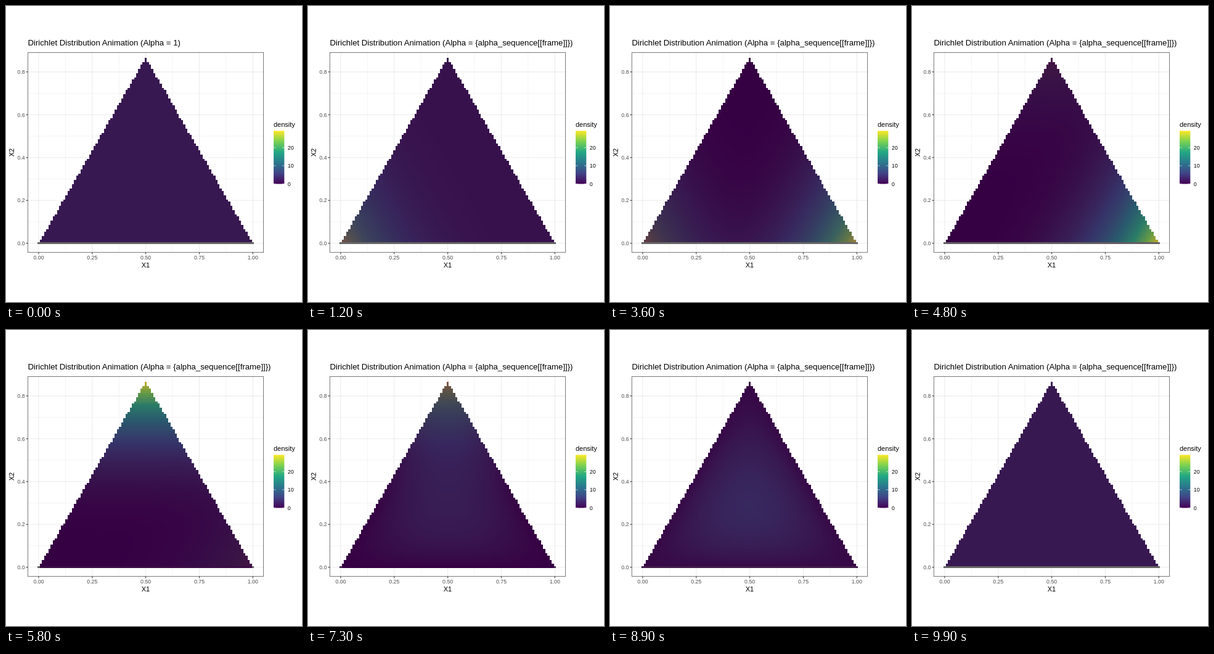
Write an HTML page with a canvas that moves like this. It is 480 px wide and 480 px high and loops after 10 s.

```html
<!DOCTYPE html>
<html lang="en">
<head>
<meta charset="utf-8">
<title>Dirichlet Distribution Animation</title>
<style>
  html, body { margin: 0; width: 100%; height: 100%; overflow: hidden; background: #fff; }
  svg, canvas { position: absolute; left: 0; top: 0; width: 480px; height: 480px; }
  text { font-family: "Liberation Sans", Arial, sans-serif; font-size: 11px; white-space: pre; }
  .small { font-size: 8.8px; fill: #4d4d4d; }
  .legend { font-size: 8.8px; }
  #title { font-size: 13.2px; }
</style>
</head>
<body>
<svg id="plot" viewBox="0 0 480 480">
  <defs><linearGradient id="ramp" x1="0" y1="1" x2="0" y2="0"></linearGradient></defs>
  <text id="title" x="35.5" y="64"></text>
  <text x="226.5" y="424" text-anchor="middle">X1</text>
  <text transform="translate(13 237.5) rotate(-90)" text-anchor="middle">X2</text>
  <text x="434" y="196">density</text>
  <rect x="434" y="202.5" width="17.3" height="86" fill="url(#ramp)"/>
</svg>
<canvas id="tiles" width="480" height="480"></canvas>
<script>
const plot = document.getElementById('plot');
const title = document.getElementById('title');
const ctx = document.getElementById('tiles').getContext('2d');

// Plot coordinates to pixels
const SCALE = 347.3;
const px = x => 53 + SCALE * x;
const py = y => 384.7 - SCALE * y;

// sRGB <-> CIE Lab
const toLinear = c => (c /= 255) > 0.04045 ? ((c + 0.055) / 1.055) ** 2.4 : c / 12.92;
const toGamma = c => 255 * (c > 0.0031308 ? 1.055 * c ** (1 / 2.4) - 0.055 : 12.92 * c);
const fwd = t => t > 0.008856 ? Math.cbrt(t) : 7.787 * t + 16 / 116;
const inv = t => t > 0.206893 ? t ** 3 : (t - 16 / 116) / 7.787;

function toLab(hex) {
  const [r, g, b] = [1, 3, 5].map(i => toLinear(parseInt(hex.slice(i, i + 2), 16)));
  const x = fwd((0.4124 * r + 0.3576 * g + 0.1805 * b) / 0.9505);
  const y = fwd(0.2126 * r + 0.7152 * g + 0.0722 * b);
  const z = fwd((0.0193 * r + 0.1192 * g + 0.9505 * b) / 1.089);
  return [116 * y - 16, 500 * (x - y), 200 * (y - z)];
}

function toRgb([L, a, b], shade) {
  const fy = (L + 16) / 116;
  const x = 0.9505 * inv(fy + a / 500), y = inv(fy), z = 1.089 * inv(fy - b / 200);
  const rgb = [
    3.2406 * x - 1.5372 * y - 0.4986 * z,
    -0.9689 * x + 1.8758 * y + 0.0415 * z,
    0.0557 * x - 0.204 * y + 1.057 * z
  ].map(c => Math.round(shade * Math.min(255, Math.max(0, toGamma(c)))));
  return `rgb(${rgb})`;
}

const mix = (p, q, t) => p.map((v, i) => v + (q[i] - v) * t);

// Colour scale
const RAMP = ['#440154', '#414487', '#2a788e', '#22a884', '#7ad151', '#fde725'];
const RAMP_LAB = RAMP.map(toLab);
const MISSING = toLab('#7f7f7f');
const MAX = 29.18;
const SHADE = 0.8;

function rampLab(t) {
  const s = Math.min(1, Math.max(0, t)) * 5, i = Math.min(4, Math.floor(s));
  return mix(RAMP_LAB[i], RAMP_LAB[i + 1], s - i);
}

// Dirichlet parameters, their normalising constants and the transitions to the next state
const STATES = [
  { alpha: [1, 1, 1], norm: 2, start: 7, steps: 13 },
  { alpha: [5, 1, 1], norm: 30, start: 27, steps: 13 },
  { alpha: [1, 5, 1], norm: 30, start: 47, steps: 12 },
  { alpha: [1, 1, 5], norm: 30, start: 66, steps: 13 },
  { alpha: [2, 2, 2], norm: 120, start: 86, steps: 13 }
];

function stateLab({ alpha, norm }, bary) {
  // A zero coordinate with alpha 1 has no defined log density
  if (bary.some((v, i) => v === 0 && alpha[i] === 1)) return MISSING;
  const density = bary.reduce((d, v, i) => d * Math.max(0, v) ** (alpha[i] - 1), norm);
  return rampLab(density / MAX);
}

const ROOT3 = Math.sqrt(3);
const tiles = [];
for (let i = 0; i <= 100; i++) {
  for (let j = 0; j <= 86; j++) {
    const x = i / 100, y = j / 100;
    if (y > ROOT3 * Math.min(x, 1 - x)) continue;
    const bary = [1 - x - y / ROOT3, x - y / ROOT3, 2 * y / ROOT3];
    const left = Math.round(px(x - 0.005)), top = Math.round(py(y + 0.005));
    tiles.push({
      left, top,
      width: Math.round(px(x + 0.005)) - left,
      height: Math.round(py(y - 0.005)) - top,
      labs: STATES.map(s => stateLab(s, bary))
    });
  }
}

// Static parts
function add(tag, attrs, text = '', parent = plot) {
  const el = document.createElementNS('http://www.w3.org/2000/svg', tag);
  for (const k in attrs) el.setAttribute(k, attrs[k]);
  el.textContent = text;
  parent.append(el);
}
const line = (x1, y1, x2, y2, stroke, width = 1.07) =>
  add('line', { x1, y1, x2, y2, stroke, 'stroke-width': width });

const L = 35.5, R = 417.5, T = 75.5, B = 399.5;
for (let i = 0; i <= 8; i++) line(px(i / 8), T, px(i / 8), B, '#ebebeb', i % 2 ? 0.53 : 1.07);
for (let i = 0; i <= 8; i++) line(L, py(i / 10), R, py(i / 10), '#ebebeb', i % 2 ? 0.53 : 1.07);
add('rect', { x: L, y: T, width: R - L, height: B - T, fill: 'none', stroke: '#333', 'stroke-opacity': 0.65 });

for (let i = 0; i <= 4; i++) {
  const x = px(i / 4), y = py(i / 5);
  line(x, B, x, B + 3, '#333');
  add('text', { x, y: 411, class: 'small', 'text-anchor': 'middle' }, (i / 4).toFixed(2));
  line(L - 3, y, L, y, '#333');
  add('text', { x: 30.7, y: y + 3.2, class: 'small', 'text-anchor': 'end' }, (i / 5).toFixed(1));
}

const ramp = document.getElementById('ramp');
RAMP.forEach((c, i) => add('stop', { offset: i / 5, 'stop-color': c }, '', ramp));
for (const v of [0, 10, 20]) {
  const y = 288.3 - v * 2.93;
  line(434, y, 437.4, y, '#fff', 0.6);
  line(447.9, y, 451.3, y, '#fff', 0.6);
  add('text', { x: 456.8, y: y + 3.2, class: 'legend' }, v);
}

let shown = -1;
function draw(step) {
  const value = step < STATES.length ? STATES[step].alpha[0] : '{alpha_sequence[[frame]]}';
  title.textContent = `Dirichlet Distribution Animation (Alpha = ${value})`;

  let from = 0;
  while (from < 4 && step > STATES[from + 1].start) from++;
  const { start, steps } = STATES[from];
  const to = (from + 1) % STATES.length;
  const t = Math.min(1, Math.max(0, (step - start) / steps));

  ctx.clearRect(0, 0, 480, 480);
  for (const { left, top, width, height, labs } of tiles) {
    ctx.fillStyle = toRgb(mix(labs[from], labs[to], t), SHADE);
    ctx.fillRect(left, top, width, height);
  }
}

const begin = performance.now();
function tick() {
  const step = Math.floor((performance.now() - begin) / 100) % 100;
  if (step !== shown) draw(shown = step);
  requestAnimationFrame(tick);
}
tick();
</script>
</body>
</html>
```
